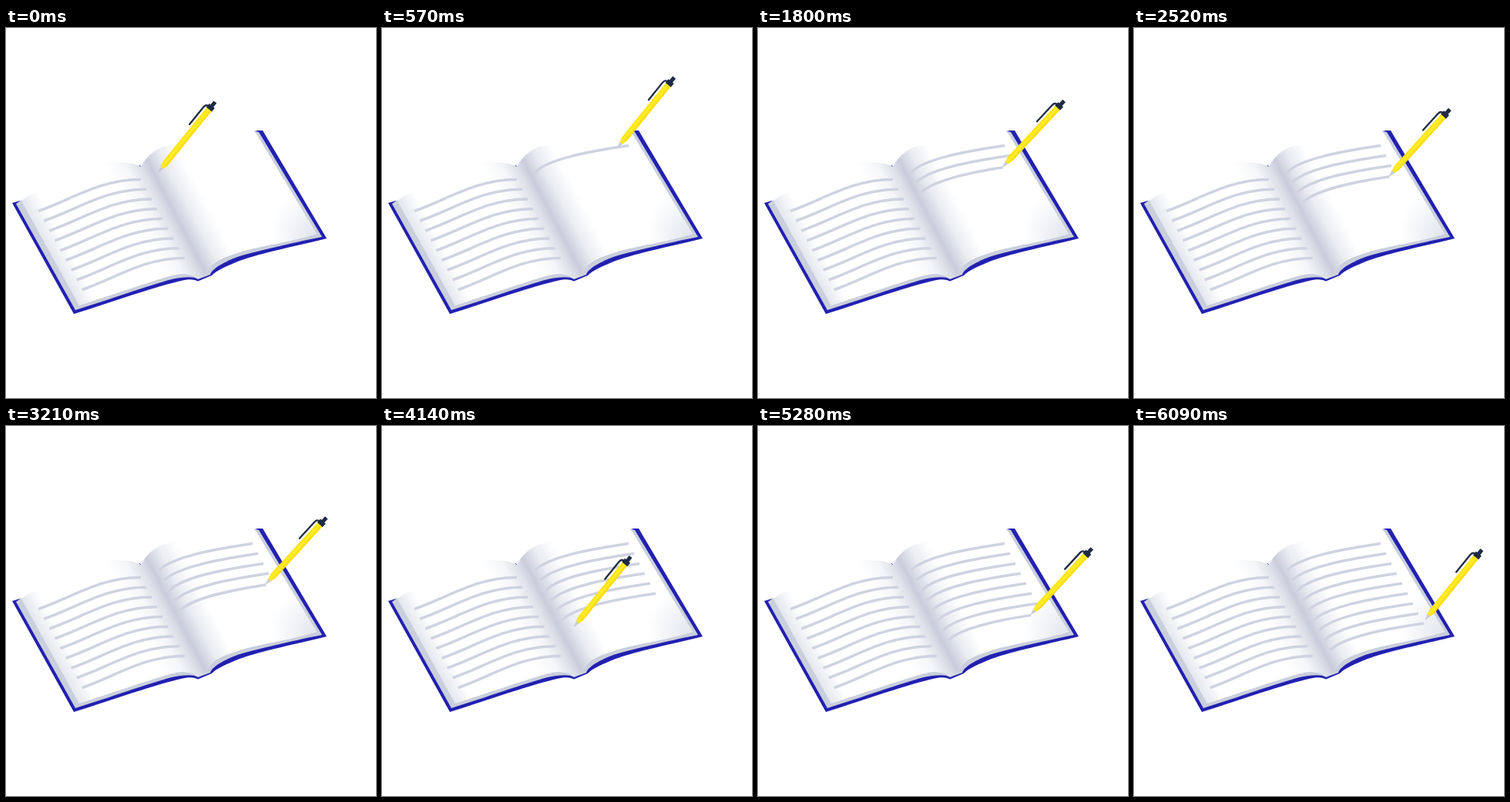
An HTML page for the animation above (6.75 s loop, 480 by 480 pixels).

```html
<!DOCTYPE html>
<html lang="en">
<head>
<meta charset="utf-8">
<title>Writing in a notebook</title>
<style>
  html, body { margin: 0; width: 100%; height: 100%; overflow: hidden; background: #fff; }
  svg { display: block; width: 100%; height: 100%; }
  .line { fill: none; stroke: #cfd3e0; stroke-width: 3.5; }
</style>
</head>
<body>
<svg viewBox="0 0 480 480">
  <defs>
    <linearGradient id="gutter" gradientUnits="userSpaceOnUse" x1="177" y1="269" x2="259" y2="226">
      <stop offset="0" stop-color="#b9c0d1" stop-opacity="0"/>
      <stop offset=".25" stop-color="#b9c0d1" stop-opacity=".15"/>
      <stop offset=".45" stop-color="#b9c0d1" stop-opacity=".55"/>
      <stop offset=".54" stop-color="#b9c0d1" stop-opacity=".8"/>
      <stop offset=".75" stop-color="#b9c0d1" stop-opacity=".3"/>
      <stop offset="1" stop-color="#b9c0d1" stop-opacity="0"/>
    </linearGradient>
    <linearGradient id="margin" gradientUnits="userSpaceOnUse" x1="20" y1="227" x2="42" y2="215">
      <stop offset="0" stop-color="#cdd3df" stop-opacity=".6"/>
      <stop offset="1" stop-color="#cdd3df" stop-opacity="0"/>
    </linearGradient>
    <radialGradient id="corner" gradientUnits="userSpaceOnUse" cx="404" cy="268" r="60">
      <stop offset="0" stop-color="#cdd3df" stop-opacity=".6"/>
      <stop offset="1" stop-color="#cdd3df" stop-opacity="0"/>
    </radialGradient>
    <linearGradient id="barrel">
      <stop offset="0" stop-color="#ffe100"/>
      <stop offset=".45" stop-color="#ffed30"/>
      <stop offset="1" stop-color="#fbd800"/>
    </linearGradient>
  </defs>

  <!-- cover -->
  <path fill="#2220b0" d="M8 227L18 224L60 290L173 178L178 181L326 133H333L416 273C380 282 330 292 303 302C288 308 272 315 267 321L249 328.5L245 327C238 325 230 327 215 331C180 340 130 358 88 371Z"/>
  <!-- page edges -->
  <path fill="#c9cfdc" d="M13 228L20 223L60 260L175 180L324 134L328 135L410 271C380 277 330 288 300 297C285 303 268 311 265 320L249 326C243 322 230 323 215 326C185 334 135 352 90 366Z"/>
  <!-- pages -->
  <g id="pages"></g>
  <g id="lines"></g>

  <g id="pen">
    <path fill="#c9ccd8" d="M-.6 0L-2.8 -9H2.8L.6 0Z"/>
    <path fill="url(#barrel)" d="M-2.2 -7L-4 -14V-107H4V-14L2.2 -7Z"/>
    <path fill="#1f2a44" d="M-4.6 -104H4.6V-110H2.5V-116.5H-2.5V-110H-4.6Z"/>
    <path fill="none" stroke="#1f2a44" stroke-width="2.3" stroke-linecap="round" d="M-3 -107Q-7.6 -107 -7.6 -102V-73"/>
  </g>
</svg>
<script>
const LOOP = 6750, STEP = 30, LAST = 6090, ROWS = 9;
const PERIOD = 695, WRITE = 470, LIFT = 60;
const $ = id => document.getElementById(id);

function add(parent, attrs) {
  const el = document.createElementNS("http://www.w3.org/2000/svg", "path");
  for (const name in attrs) el.setAttribute(name, attrs[name]);
  return parent.appendChild(el);
}

const leftPage = "M20 224Q34 213 52 210C90 196 110 174 141 174Q165 174 175 180L249 325C240 318 228 317 212 322C185 330 135 347 95 360Z";
const rightPage = "M175 180Q184 162 203 154L318 130L324 136L403 267C370 278 325 283 297 293C275 300 262 308 260 320L249 325Z";
for (const [d, fills] of [
  [leftPage, ["#fff", "url(#margin)", "url(#gutter)"]],
  [rightPage, ["#fff", "url(#corner)", "url(#gutter)"]]
]) for (const fill of fills) add($("pages"), { d, fill });

const addLine = (d, dx, dy, row) =>
  add($("lines"), { d, class: "line", transform: `translate(${dx * row} ${dy * row})` });

const rows = [];
for (let i = 0; i < ROWS; i++) {
  addLine("M42 237.5C85 222.5 125 195.5 175 196.5", 7.1, 12.75, i);
  rows.push(addLine("M198 187.5C215 170.5 265 160.5 320 152.5", 7, 12.95, i));
}
const length = rows[0].getTotalLength();

function pointOn(row, part) {
  const p = rows[0].getPointAtLength(length * part);
  return [p.x + 7 * row, p.y + 12.95 * row];
}

function draw(time) {
  const row = Math.min(ROWS - 1, Math.floor(time / PERIOD));
  const phase = time - row * PERIOD;
  const part = Math.min(1, phase / WRITE);
  const stroke = Math.min(1, phase / (WRITE + LIFT));
  const lift = Math.max(0, Math.min(1, (phase - WRITE) / LIFT));

  rows.forEach((line, i) => {
    const shown = i < row ? 1 : i > row ? 0 : part;
    line.style.display = shown ? "" : "none";
    line.setAttribute("stroke-dasharray", `${length * shown + (shown === 1)} 999`);
  });

  let [x, y] = pointOn(row, part);
  x += 2 * lift;
  y -= 4 * lift;
  if (stroke === 1 && row < ROWS - 1) {
    const back = (phase - WRITE - LIFT) / (PERIOD - WRITE - LIFT);
    const eased = (1 - Math.cos(Math.PI * back)) / 2;
    const [nx, ny] = pointOn(row + 1, 0);
    x += (nx - x) * eased;
    y += (ny - y) * eased;
  }
  const angle = 39 + 6 * Math.sin(Math.PI * stroke);
  $("pen").setAttribute("transform", `translate(${x} ${y - 1}) rotate(${angle})`);
}

const start = performance.now();
function tick() {
  const time = (performance.now() - start) % LOOP;
  draw(Math.min(LAST, Math.floor(time / STEP) * STEP));
  requestAnimationFrame(tick);
}
tick();
</script>
</body>
</html>
```
